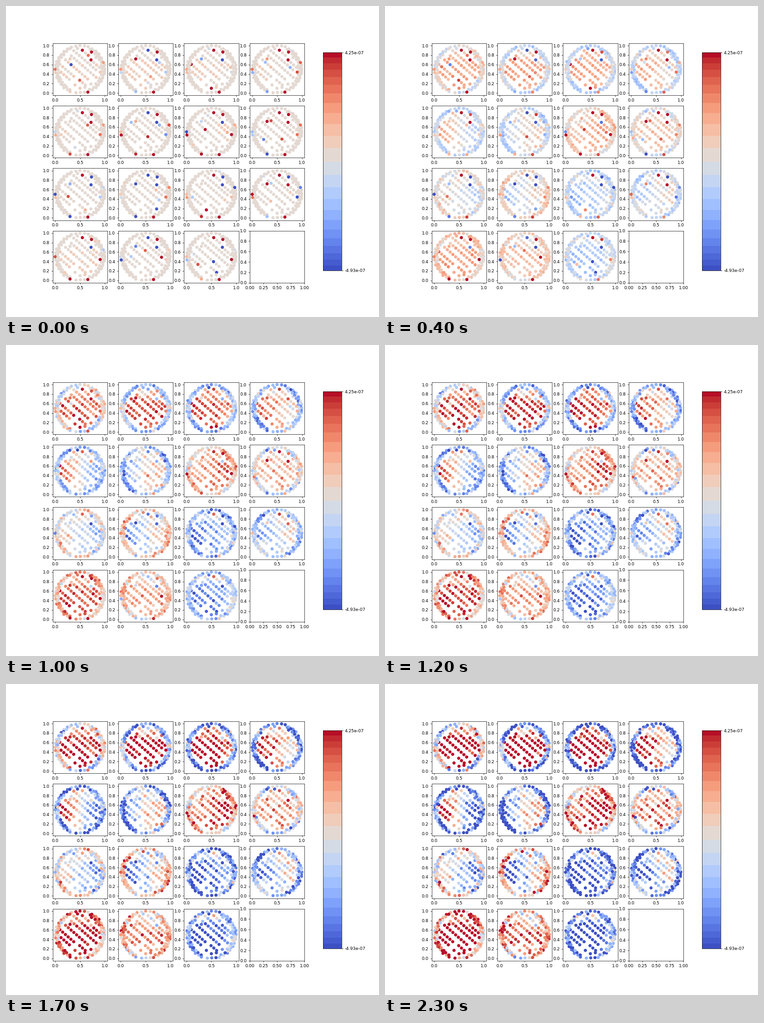
A matplotlib script for the animation above (2400 ms loop, 820 by 683 pixels).

```python
import matplotlib.pyplot as plt
import numpy as np
from matplotlib.animation import FuncAnimation
from matplotlib.colors import BoundaryNorm, ListedColormap

W, H, DPI = 820, 683, 64
FRAMES = 24
VMIN, VMAX = -4.93, 4.25  # in units of 1e-7
K = (W / 12) / DPI        # a 12 inch wide layout, shown smaller

plt.rcParams.update({
    "font.family": "DejaVu Sans", "font.size": 10 * K,
    "axes.linewidth": 0.8 * K, "lines.linewidth": 1.5 * K,
    "lines.markersize": 6.4 * K,
})
for t in ("xtick", "ytick"):
    plt.rcParams.update({f"{t}.major.size": 3.5 * K, f"{t}.major.width": 0.8 * K,
                         f"{t}.major.pad": 3.5 * K})

# Stepped colour scale, with the widest steps in the middle.
u = np.linspace(-1, 1, 25)
level = .5 + .5 * u * (1.5 - .5 * np.abs(u))
cmap = ListedColormap(plt.get_cmap("coolwarm")((level[1:] + level[:-1]) / 2))
norm = BoundaryNorm(VMIN + level * (VMAX - VMIN), cmap.N)

rng = np.random.default_rng(12)

# The first three sites lead; the fourth is always warm.
HOT = np.array([(.548, .904), (.731, .865), (.722, .70), (.658, .019), (.0, .5),
                (.009, .433), (.905, .442), (.97, .644), (.30, .03), (.30, .72)])


def ring(n, r, shift, min_cos):
    a = 2 * np.pi * (np.arange(n) + shift) / n
    a = a[np.abs(np.cos(a)) >= min_cos]
    return np.c_[.5 + r * np.cos(a), .5 + r * np.sin(a)]


def row(x, y, n):
    i = np.arange(n)
    return np.c_[x + .0555 * i, y - .0505 * i]


def layout():
    rows = [(.064, .490, 5), (.096, .606, 6), (.210, .700, 9), (.325, .784, 10),
            (.375, .894, 10), (.610, .846, 2), (.777, .644, 3), (.494, .270, 3)]
    singles = [(.40, .17), (.50, .10), (.60, .12), (.72, .19), (.82, .75), (.45, .94)]
    rim = np.vstack([ring(36, .498, 0, 0), ring(36, .475, .5, .3),
                     ring(40, .445, .25, .62)])
    rim += rng.normal(0, .006, rim.shape)
    pts = np.vstack([row(*r) for r in rows] + [singles, rim])
    gap = np.hypot(*(pts[:, None] - HOT[None]).transpose(2, 0, 1)).min(axis=1)
    return np.vstack([pts[gap > .034], HOT])


PTS = layout()
X, Y = PTS.T
ANGLE = np.arctan2(Y - .5, X - .5)
ON_RING = np.hypot(X - .5, Y - .5) > .42

# Where each panel drifts to: its rim, and the left and right of its core.
RIM = [-1, -3, -4, -4, -4, -4, 1, -1, 0, 1, -4, -3, 2, 1, -3]
LEFT = [6, 6, 6, 5, 5, -3, 2, 2, 1, -6, -7, -4, 6, 3, -7]
RIGHT = [4, 5, 4, 0, -5, 2, 6, 2, -4, 2, -3, 0, 5, 2, -4]


def drift(p):
    wave = 1.5 * np.cos(2 * ANGLE - rng.uniform(0, 2 * np.pi))
    fade = np.clip((1 - Y) / .4, .2, 1)
    core = fade * np.interp(X, [.2, .8], [LEFT[p], RIGHT[p]])
    noise = rng.normal(0, 1, len(PTS)) * np.where(ON_RING, 1.8, 1.2)
    return 1.15 * np.where(ON_RING, RIM[p] + wave, core) + noise


def burst(p):
    r, c = divmod(p, 4)
    warm = [c != 1, r != 2, c == 3 or (c == 0 and r < 2)]
    out = np.zeros(len(PTS))
    sites = rng.normal(0, 3.5, len(HOT))
    sites[:3] = np.where(warm, 6.5, -6.5)
    sites[3] = 5
    out[-len(HOT):] = sites
    inner = np.flatnonzero(~ON_RING)[:-4]
    out[rng.choice(inner, 3, replace=False)] = rng.normal(0, 3, 3)
    return out


panels = [(drift(p), burst(p)) for p in range(len(RIM))]


def values(p, k):
    field, extra = panels[p]
    return field * ((k + .3) / FRAMES) ** .75 + extra * np.exp(-k / 16)


fig, axes = plt.subplots(4, 4, figsize=(W / DPI, H / DPI), dpi=DPI)
fig.subplots_adjust(left=.125, right=.8, bottom=.11, top=.88, wspace=.2, hspace=.2)

dots = []
for p, ax in enumerate(axes.flat):
    ax.set_yticks(np.arange(6) / 5)
    if p < len(panels):
        ax.set_xticks([0, .5, 1])
        ax.set(xlim=(-.05, 1.05), ylim=(-.05, 1.05))
        dots.append(ax.scatter(X, Y, c=values(p, 0), cmap=cmap, norm=norm))
    else:
        ax.set_xticks(np.arange(5) / 4)
        ax.set(xlim=(0, 1), ylim=(0, 1))

bar = fig.colorbar(dots[0], cax=fig.add_axes([.85, .15, .05, .7]),
                   spacing="proportional")
bar.set_ticks([VMIN, VMAX], labels=["-4.93e-07", "4.25e-07"])
bar.minorticks_off()


def update(k):
    for p, d in enumerate(dots):
        d.set_array(values(p, k))
    return dots


anim = FuncAnimation(fig, update, frames=FRAMES, interval=100, repeat=True,
                     repeat_delay=0, blit=False)
plt.show()
```
